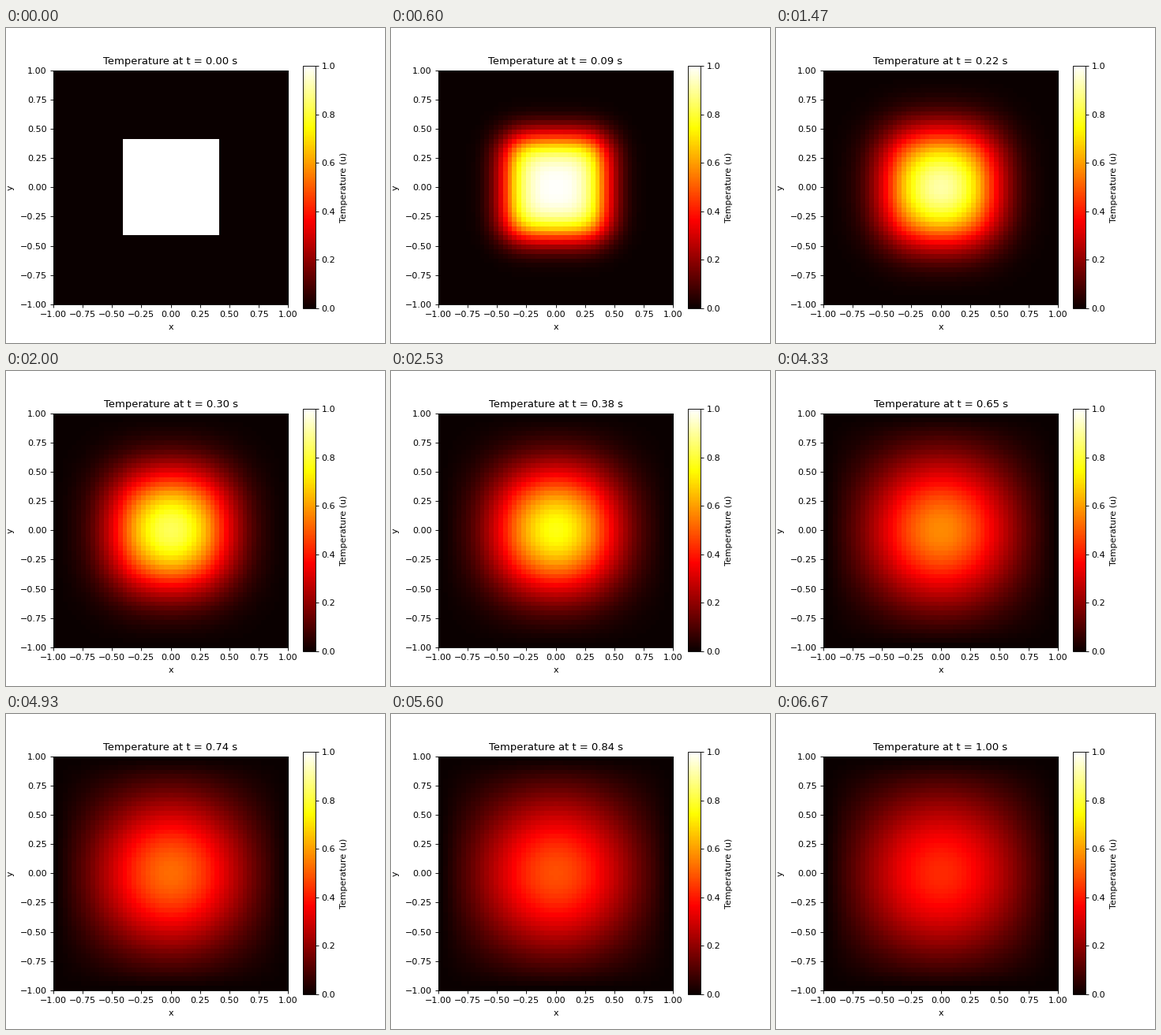
Recreate the animation shown at these times as a matplotlib script. Size 480 by 400 pixels, loop 6740 ms.

```python
import numpy as np
import matplotlib.pyplot as plt
from matplotlib.animation import FuncAnimation

# Heat equation on a square plate with cold edges
N = 51
ALPHA = 0.1
DT = 0.001
STEPS_PER_STATE = 10
STATES = 101

WIDTH, HEIGHT, DPI = 480, 400, 80
TICK_MS = 20
TICKS = 337

x = np.linspace(-1, 1, N)
dx = x[1] - x[0]
X, Y = np.meshgrid(x, x)


def step(u):
    new = u.copy()
    lap = (u[2:, 1:-1] + u[:-2, 1:-1] + u[1:-1, 2:] + u[1:-1, :-2]
           - 4 * u[1:-1, 1:-1]) / dx**2
    new[1:-1, 1:-1] += ALPHA * DT * lap
    return new


def solve():
    u = np.where((abs(X) < 0.41) & (abs(Y) < 0.41), 1.0, 0.0)
    states = [u]
    for _ in range(STATES - 1):
        for _ in range(STEPS_PER_STATE):
            u = step(u)
        states.append(u)
    return states


def pixel_axes(left, bottom, width, height):
    return fig.add_axes((left / WIDTH, bottom / HEIGHT,
                         width / WIDTH, height / HEIGHT))


states = solve()

plt.rcParams["font.family"] = "DejaVu Sans"
fig = plt.figure(figsize=(WIDTH / DPI, HEIGHT / DPI), dpi=DPI)
ax = pixel_axes(59.6, 49, 297.8, 297.4)
cax = pixel_axes(376.2, 44, 15.4, 308)

image = ax.imshow(states[0], extent=(-1, 1, -1, 1), origin="lower",
                  cmap="hot", vmin=0, vmax=1, aspect="auto")
ticks = np.linspace(-1, 1, 9)
ax.set_xticks(ticks)
ax.set_yticks(ticks)
ax.set_xlabel("x", labelpad=6)
ax.set_ylabel("y", labelpad=6)
title = ax.set_title("", fontsize=11.8, pad=7)
bar = fig.colorbar(image, cax=cax)
bar.set_label("Temperature (u)", fontsize=9.85, labelpad=5)


def update(tick):
    # 15 states per second, each start rounded to the tick
    i = min((3 * tick + 2) // 10, STATES - 1)
    image.set_data(states[i])
    title.set_text(f"Temperature at t = {i * DT * STEPS_PER_STATE:.2f} s")
    return image, title


anim = FuncAnimation(fig, update, frames=TICKS, interval=TICK_MS,
                     init_func=lambda: update(0), repeat=True,
                     repeat_delay=0, blit=False)
plt.show()
```
